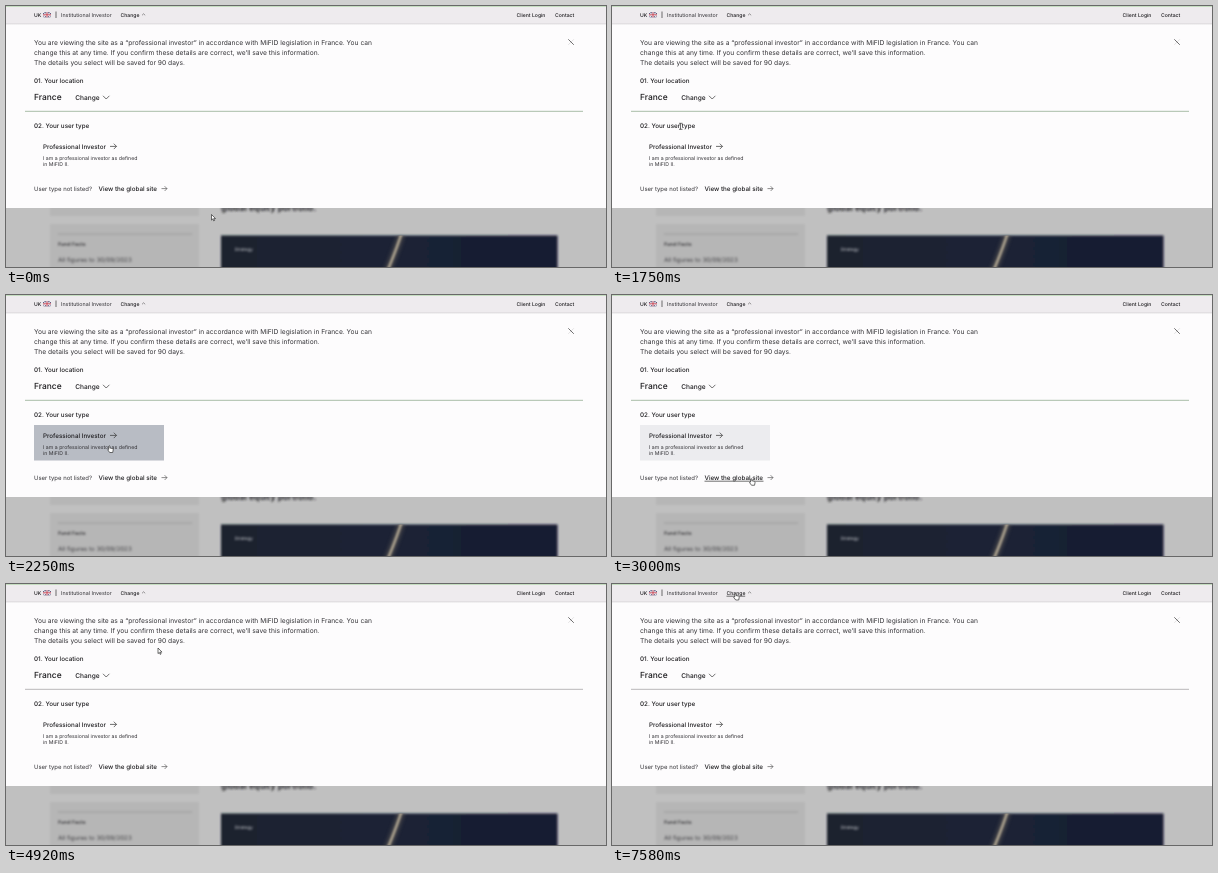
These frames come from a looping animation (600x261 px, 8 s). An HTML page:

```html
<!DOCTYPE html>
<html lang="en">
<head>
<meta charset="utf-8">
<title>Investor type panel</title>
<style>
html, body { margin: 0; width: 100%; height: 100%; overflow: hidden; background: #c0c0c0; }
svg { display: block; width: 600px; height: 261px; }
text { font-family: Inter, "Liberation Sans", sans-serif; text-rendering: geometricPrecision; fill: #333236; }
.medium text, text.medium { font-weight: 500; fill: #1d1c1f; }
.bar { font-size: 5.1px; }
.intro { font-size: 6.66px; }
.label { font-size: 6.28px; }
.note { font-size: 5.2px; }
.line { fill: none; stroke: #333; stroke-width: .7; }
.cursor { stroke: #222; stroke-width: .65; fill: #fff; stroke-linejoin: round; }
</style>
</head>
<body>
<svg viewBox="0 0 600 261">
  <defs>
    <linearGradient id="sky">
      <stop offset="0" stop-color="#1a202e"/>
      <stop offset=".5" stop-color="#1c2436"/>
      <stop offset="1" stop-color="#121a30"/>
    </linearGradient>
    <linearGradient id="shade" x2="0" y2="1">
      <stop offset="0" stop-color="#000" stop-opacity=".1"/>
      <stop offset="1" stop-color="#000" stop-opacity="0"/>
    </linearGradient>
    <filter id="soft" x="-20%" y="-40%" width="140%" height="180%"><feGaussianBlur stdDeviation=".9"/></filter>
    <filter id="glow" x="-100%" y="-20%" width="300%" height="140%"><feGaussianBlur stdDeviation="2"/></filter>
    <clipPath id="photo"><rect x="215" y="229.5" width="336.5" height="32"/></clipPath>
  </defs>

  <g id="page">
    <rect width="600" height="261" fill="#c0c0c0"/>
    <g filter="url(#soft)">
      <path d="M44 195h149v15H44zM44 218h149v50H44z" fill="#b6b6b6"/>
      <path d="M52 228h134" stroke="#999"/>
      <text x="52" y="240.2" font-size="5.2" font-weight="700">Fund Facts</text>
      <text x="52" y="256.3" font-size="6.2">All figures to 30/09/2023</text>
      <text x="215" y="205.3" font-size="8.6" font-weight="700">global equity portfolio.</text>
      <rect x="215" y="229.5" width="336.5" height="40" fill="url(#sky)"/>
    </g>
    <g clip-path="url(#photo)" fill="none">
      <path d="M396 226Q391 242 381 266" stroke="#6f695f" stroke-width="6" filter="url(#glow)" opacity=".6"/>
      <path d="M396 226Q391 242 381 266" stroke="#c4b8a0" stroke-width="2" filter="url(#soft)"/>
    </g>
    <text x="228.5" y="245" font-size="4.6" style="fill:#d0d2d8" filter="url(#soft)">Strategy</text>
  </g>

  <rect width="600" height="202" fill="#fdfcfd"/>
  <rect width="600" height="18" fill="#eeebee"/>
  <rect width="600" height="1" fill="#c5ddc0"/>
  <rect y="17.5" width="600" height="2" fill="url(#shade)"/>

  <g id="flag">
    <rect x="37" y="6.3" width="8" height="5" fill="#4b4a72"/>
    <path d="M37 6.3l8 5m0-5l-8 5" stroke="#fff"/>
    <path d="M41 6.3v5M37 8.8h8" stroke="#fff" stroke-width="1.7"/>
    <path d="M41 6.3v5M37 8.8h8" stroke="#c23a4c" stroke-width=".9"/>
  </g>
  <path class="line" d="M50 5.5v6.5"/>
  <text x="55" y="11" font-size="5.33">Institutional Investor</text>
  <g class="bar medium">
    <text x="28" y="11">UK</text>
    <text x="114.5" y="11">Change</text>
    <text x="510.5" y="11">Client Login</text>
    <text x="549" y="11">Contact</text>
  </g>
  <path class="line" d="M136 9.3l1.6-1.5 1.6 1.5" opacity=".7"/>
  <path class="line" id="topLine" d="M114.5 12.2h18.7"/>

  <g class="intro">
    <text x="28" y="39.3">You are viewing the site as a “professional investor” in accordance with MiFID legislation in France. You can</text>
    <text x="28" y="49.1">change this at any time. If you confirm these details are correct, we’ll save this information.</text>
    <text x="28" y="59">The details you select will be saved for 90 days.</text>
  </g>
  <path class="line" d="M562.3 33.3l5.5 5.5"/>
  <path class="line" d="M567.8 33.3l-5.5 5.5" opacity=".2"/>

  <text class="medium" x="28" y="94.2" font-size="8.43">France</text>
  <text class="medium" x="69.3" y="93.9" font-size="6.55">Change</text>
  <path class="line" d="M97 89.8l3.2 3.2 3.2-3.2"/>
  <path id="divider" d="M19 105.3h558"/>

  <rect id="card" x="28" y="130" width="130" height="35.5" fill="#b8bcc4"/>
  <g class="label medium">
    <text x="28" y="76.8">01. Your location</text>
    <text x="28" y="121.6">02. Your user type</text>
    <text x="37" y="142.7">Professional Investor</text>
    <text x="92.5" y="184.9">View the global site</text>
  </g>
  <path class="line" d="M104 140.4h6.5m-2.7-2.7l2.7 2.7-2.7 2.7"/>
  <g class="note">
    <text x="37" y="153.5">I am a professional investor as defined</text>
    <text x="37" y="160">in MiFID II.</text>
  </g>
  <text x="28" y="184.9" font-size="5.96">User type not listed?</text>
  <path class="line" d="M155.5 182.6h5.5m-2.4-2.4l2.4 2.4-2.4 2.4" opacity=".8"/>
  <path class="line" id="linkLine" d="M92.5 186.2h59"/>

  <g id="pointer">
    <path class="cursor" id="arrow" d="M0 0v5.6l1.3-1.2.9 2 .9-.4-.9-1.9H4z"/>
    <path class="line" id="beam" d="M0 .3h3.5M1.5.3v6M0 6.3h3.5"/>
    <path class="cursor" id="hand" d="M1.3 3.8V.7q.6-.8 1.2 0v1.8l2.6.6q.8.3.6 1.3l-.5 2.6h-3l-2-2.7q.1-.8 1.1-.5z"/>
  </g>
</svg>
<script>
const LOOP = 8000, TICK = 1000 / 12;
const $ = id => document.getElementById(id);

// Each move: first tick, length in ticks, where it ends
const home = [205.5, 208.5];
const moves = [
  [1, 2, 78, 106], [4, 5, 43, 70], [10, 3, 56, 67], [14, 1, 63, 74],
  [16, 4, 67, 117], [22, 6, 101.5, 150.5], [30, 3, 120, 157],
  [34, 4, 138.5, 185], [39, 4, 156, 188], [44, 1, 437, 135],
  [50, 5, 189, 64], [57, 3, 152, 64], [61, 6, 129, 13],
  [68, 3, 125, 9], [88, 4, 121.5, 9]
];

const clamp = v => Math.min(1, Math.max(0, v));
const easeOut = u => 1 - (1 - u) ** 2;
const within = (k, from, to) => k >= from && k < to;
const show = (id, on) => { $(id).style.visibility = on ? "visible" : "hidden"; };

function position(k) {
  return moves.reduce(([x, y], [first, length, toX, toY]) => {
    const u = easeOut(clamp((k - first + 1) / length));
    return [x + (toX - x) * u, y + (toY - y) * u];
  }, home);
}

function draw(time) {
  // the picture advances twelve times a second
  const k = Math.floor((time % LOOP + 4) / TICK) % 96;
  const onLink = within(k, 35, 44), onTop = k >= 68;
  const away = within(k, 45, 50);
  const hand = onLink || onTop || within(k, 23, 34);
  const beam = within(k, 19, 23);

  $("pointer").setAttribute("transform", `translate(${position(k)})`);
  show("hand", hand);
  show("beam", beam);
  show("arrow", !hand && !beam && !away);
  show("linkLine", onLink);
  show("topLine", onTop);
  $("card").setAttribute("opacity", clamp((k - 22) / 5) * clamp((37 - k) / 4));
  $("divider").setAttribute("stroke", k < 50 ? "#a9bda8" : "#b9b7ba");
}

const start = performance.now();
function frame() {
  draw(performance.now() - start);
  requestAnimationFrame(frame);
}
frame();
</script>
</body>
</html>
```
